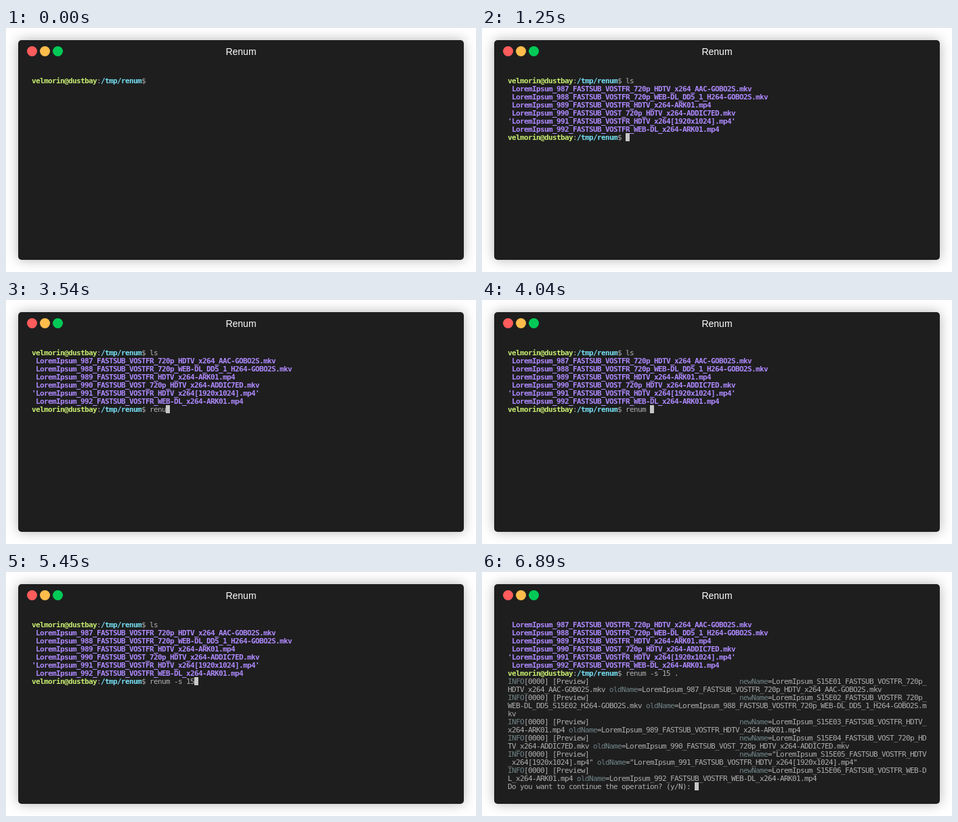
Recreate the animation shown at these times as an HTML page. Size 694 px wide and 362 px high, loop 8 s.

```html
<!DOCTYPE html>
<html lang="en">
<head>
<meta charset="utf-8">
<title>Renum</title>
<style>
  html, body { margin: 0; width: 100%; height: 100%; overflow: hidden; background: #fff; }
  .window {
    position: absolute; left: 18px; top: 18px; width: 658px; height: 326px;
    border-radius: 5px; background: #1e1e1e; box-shadow: 0 0 18px rgba(0, 0, 0, .3);
  }
  .title {
    position: absolute; left: 0; right: 0; top: 9px; text-align: center; color: #fff;
    font: 14px/16px "Liberation Sans", Arial, sans-serif;
  }
  .dot { position: absolute; top: 9px; width: 15px; height: 15px; border-radius: 50%; }
  .screen {
    position: absolute; left: 20px; top: 54px; color: #afafaf; white-space: pre;
    font: 11px/13px "Ubuntu Mono", "DejaVu Sans Mono", monospace;
    font-family: "DejaVu Sans Mono", monospace; letter-spacing: -.6226px;
    font-variant-ligatures: none;
  }
  .row { height: 12px; }
  .user, .path, .file { font-weight: bold; }
  .user { color: #c8ed71; }
  .path { color: #75dff2; }
  .file { color: #ae89fe; }
  .key { color: #708387; }
  .cursor { position: absolute; width: 6px; height: 12px; background: #c7c7c7; }
</style>
</head>
<body>
<div class="window">
  <div class="dot" style="left:13px;background:#ff5c5c"></div>
  <div class="dot" style="left:32px;background:#ffbd4c"></div>
  <div class="dot" style="left:51px;background:#00ca56"></div>
  <div class="title">Renum</div>
  <div class="screen" id="screen"></div>
</div>
<script>
const LOOP = 8000, COLS = 103, CELL_W = 6, CELL_H = 12;
const screenEl = document.getElementById('screen');

const files = [
  'LoremIpsum_987_FASTSUB_VOSTFR_720p_HDTV_x264_AAC-GOBO2S.mkv',
  'LoremIpsum_988_FASTSUB_VOSTFR_720p_WEB-DL_DD5_1_H264-GOBO2S.mkv',
  'LoremIpsum_989_FASTSUB_VOSTFR_HDTV_x264-ARK01.mp4',
  'LoremIpsum_990_FASTSUB_VOST_720p_HDTV_x264-ADDIC7ED.mkv',
  'LoremIpsum_991_FASTSUB_VOSTFR_HDTV_x264[1920x1024].mp4',
  'LoremIpsum_992_FASTSUB_VOSTFR_WEB-DL_x264-ARK01.mp4'
];

// A line is a list of [text, class] runs.
const prompt = cmd => [['velmorin@dustbay', 'user'], [':'], ['/tmp/renum', 'path'], ['$ ' + cmd]];
const quote = (name, mark, pad) => name.includes('[') ? mark + name + mark : pad + name;
const listing = files.map(f => [[quote(f, "'", ' '), 'file']]);

const preview = files.map((f, i) => {
  const renamed = f.replace(/_\d+_/g, `_S15E0${i + 1}_`);
  return [
    ['INFO', 'key'], ['[0000] [Preview]'.padEnd(53)],
    ['newName', 'key'], ['=' + quote(renamed, '"', '') + ' '],
    ['oldName', 'key'], ['=' + quote(f, '"', '')]
  ];
});

function wrap(line) {
  const rows = [[]];
  let col = 0;
  for (let [text, cls] of line) {
    while (text) {
      if (col === COLS) { rows.push([]); col = 0; }
      const part = text.slice(0, COLS - col);
      rows[rows.length - 1].push([part, cls]);
      col += part.length;
      text = text.slice(part.length);
    }
  }
  return rows;
}

function draw(lines, showCursor) {
  const rows = lines.flatMap(wrap);
  screenEl.replaceChildren(...rows.map(row => {
    const el = document.createElement('div');
    el.className = 'row';
    for (const [text, cls] of row) {
      const span = document.createElement('span');
      if (cls) span.className = cls;
      span.textContent = text;
      el.append(span);
    }
    return el;
  }));
  if (!showCursor) return;
  const last = rows[rows.length - 1];
  const col = last.reduce((n, [text]) => n + text.length, 0);
  const cursor = document.createElement('div');
  cursor.className = 'cursor';
  cursor.style.left = col * CELL_W + 'px';
  cursor.style.top = (rows.length - 1) * CELL_H + 'px';
  screenEl.append(cursor);
}

const command = 'renum -s 15 .';
const keyTimes = [3250, 3320, 3470, 3540, 3850, 4040, 4460, 4570, 4920, 5210, 5450, 6130, 6400];
const session = cmd => [prompt('ls'), ...listing, prompt(cmd)];

const steps = [
  [0, () => draw([prompt('')], false)],
  [500, () => draw([prompt('l')], true)],
  [600, () => draw([prompt('ls')], true)],
  [1250, () => draw(session(''), true)],
  ...keyTimes.map((t, i) => [t, () => draw(session(command.slice(0, i + 1)), true)]),
  [6890, () => draw([
    ...listing, prompt(command), ...preview,
    [['Do you want to continue the operation? (y/N): ']]
  ], true)]
];

const start = performance.now();
let shown = -1;
function tick() {
  const t = (performance.now() - start) % LOOP;
  const i = steps.findLastIndex(([at]) => at <= t);
  if (i !== shown) steps[shown = i][1]();
  requestAnimationFrame(tick);
}
tick();
</script>
</body>
</html>
```
